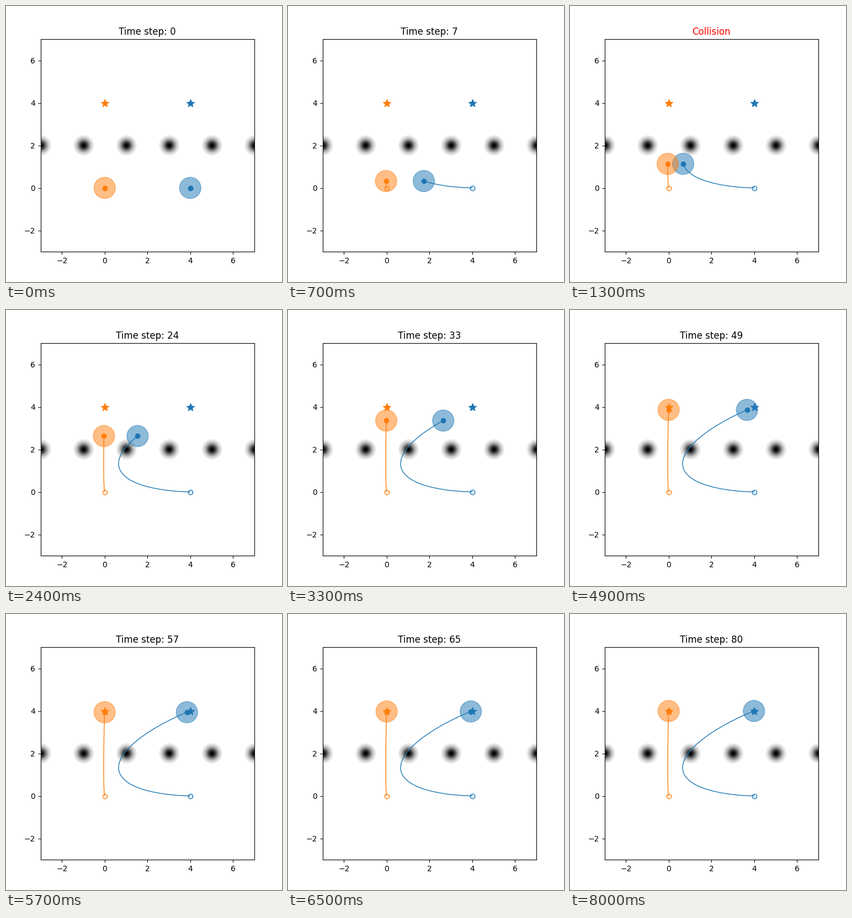
A matplotlib script that plays this animation: 500x500 px, repeating every 8100 ms.

```python
import numpy as np
import matplotlib.pyplot as plt
from matplotlib.animation import FuncAnimation

STEPS = 81
INTERVAL = 100
RADIUS = 0.5
LIMITS = (-3, 7)


def rise(t):
    """Third-order critically damped approach from 0 to 4."""
    u = (0.1438 - 0.00012 * t) * t
    return 4 - 4 * (1 + u + u * u / 2) * np.exp(-u)


def swerve(t, peak=14.3, power=1.92):
    """Sideways push that reaches 1 at the peak and then fades out."""
    s = t / peak
    return (s * np.exp(1 - s)) ** power


t = np.arange(STEPS)
y = rise(t)
left_x = -0.046 * swerve(t)
right_x = 4 - 3.35 * swerve(t)
collides = np.abs(right_x - left_x) < 2 * RADIUS

fig, ax = plt.subplots(figsize=(5, 5), dpi=100)

# Row of soft round obstacles
gx, gy = np.meshgrid(np.linspace(*LIMITS, 776), np.linspace(*LIMITS, 771))
density = sum(np.exp(-((gx - cx) ** 2 + (gy - 2) ** 2) / (2 * 0.2 ** 2))
              for cx in range(-3, 8, 2))
density[density < 0.055] = 0
ax.imshow(density, extent=LIMITS * 2, origin="lower", cmap="binary",
          vmin=0, vmax=1, aspect="auto", zorder=0)
ax.set(xlim=LIMITS, ylim=LIMITS)
title = ax.set_title("")


class Agent:
    def __init__(self, x, color):
        self.x = x
        start = x[0]
        self.body = ax.add_patch(plt.Circle((start, 0), RADIUS, color=color, alpha=0.5))
        self.trail, = ax.plot([], [], color=color, lw=1)
        ax.plot(start, 0, "o", color=color, fillstyle="none")
        ax.plot(start, 4, "*", color=color, ms=10)
        self.dot, = ax.plot([], [], "o", color=color)

    def move(self, n):
        self.body.center = self.x[n], y[n]
        self.trail.set_data(self.x[:n + 1], y[:n + 1])
        self.dot.set_data([self.x[n]], [y[n]])


agents = [Agent(right_x, "C0"), Agent(left_x, "C1")]


def update(n):
    for agent in agents:
        agent.move(n)
    title.set_text("Collision" if collides[n] else f"Time step: {n}")
    title.set_color("red" if collides[n] else "black")
    return []


anim = FuncAnimation(fig, update, frames=STEPS, interval=INTERVAL,
                     init_func=lambda: update(0), repeat=True)
plt.show()
```
